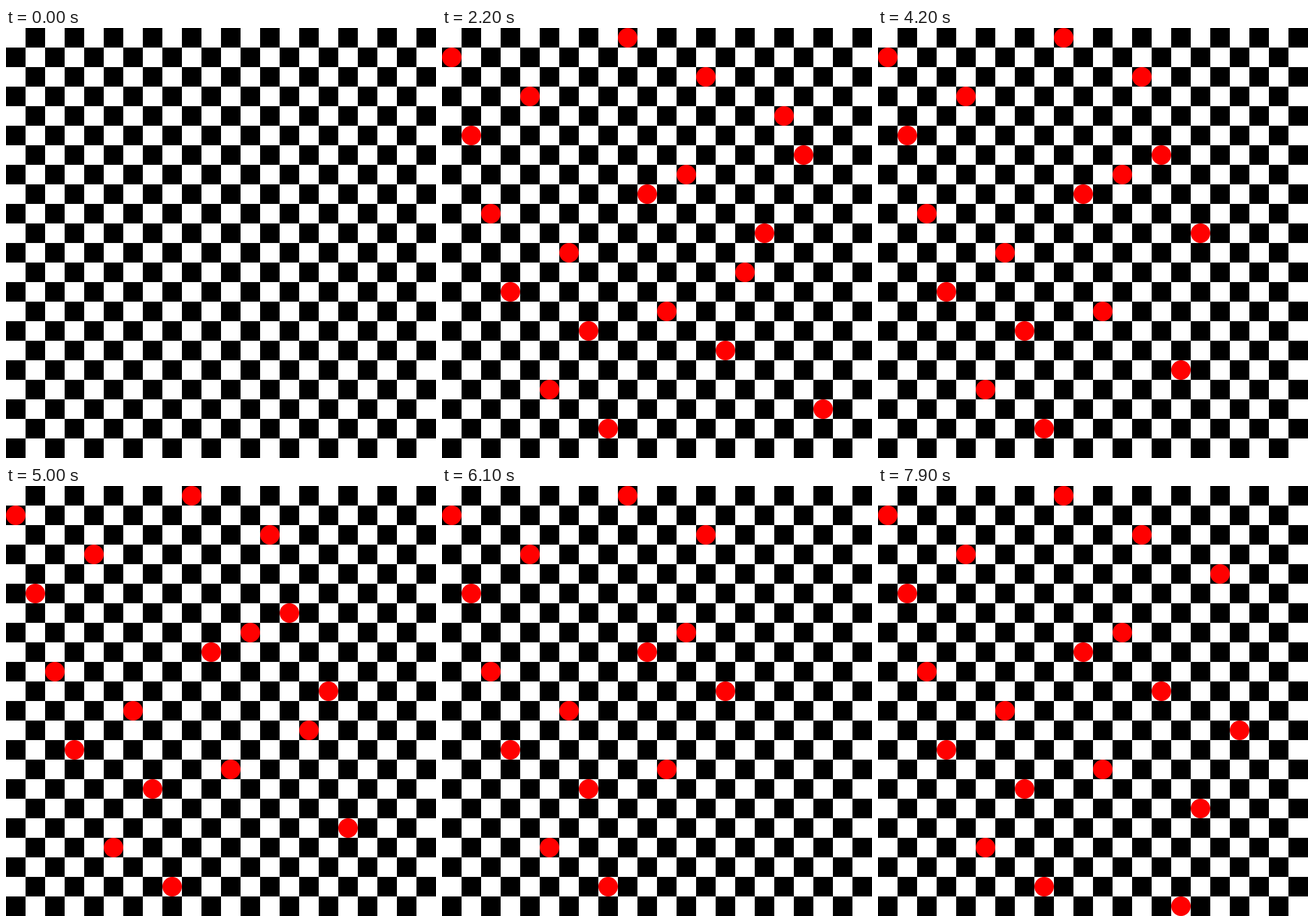
An HTML page with a canvas that plays this animation: 748 px wide and 748 px high, repeating every 8 s.

```html
<!DOCTYPE html>
<html lang="en">
<head>
<meta charset="utf-8">
<title>Queens search</title>
<style>
  html, body { margin: 0; width: 100%; height: 100%; overflow: hidden; background: #fff; }
  canvas { display: block; }
</style>
</head>
<body>
<canvas id="board" width="748" height="748"></canvas>
<script>
const N = 22, CELL = 34, STEP = 100, STEPS = 80;
const ctx = document.getElementById('board').getContext('2d');

// Rows are tried in this order in every column.
const order = [1, 5, 9, 13, 3, 18, 11, 15, 20, 0, 8, 14, 7, 4, 16, 17, 2, 6, 12, 10, 19, 21];

// Depth-first search; each placed queen is one step of the animation.
function search() {
  const steps = [[]];
  const safe = (queens, row) => queens.every((r, c) =>
    r !== row && Math.abs(r - row) !== queens.length - c);

  function place(queens) {
    if (queens.length === N) return;
    for (const row of order) {
      if (steps.length >= STEPS) return;
      if (!safe(queens, row)) continue;
      const next = [...queens, row];
      steps.push(next);
      place(next);
    }
  }
  place([]);
  return steps;
}

function draw(queens) {
  ctx.fillStyle = '#fff';
  ctx.fillRect(0, 0, N * CELL, N * CELL);
  ctx.fillStyle = '#000';
  for (let r = 0; r < N; r++) {
    for (let c = (r + 1) % 2; c < N; c += 2) {
      ctx.fillRect(c * CELL, r * CELL, CELL, CELL);
    }
  }
  ctx.fillStyle = '#f00';
  queens.forEach((r, c) => {
    ctx.beginPath();
    ctx.arc((c + 0.5) * CELL, (r + 0.5) * CELL, CELL / 2, 0, Math.PI * 2);
    ctx.fill();
  });
}

const steps = search();
const start = performance.now();

function tick() {
  const time = Math.max(0, performance.now() - start);
  draw(steps[Math.floor(time / STEP) % STEPS]);
  requestAnimationFrame(tick);
}
tick();
</script>
</body>
</html>
```
